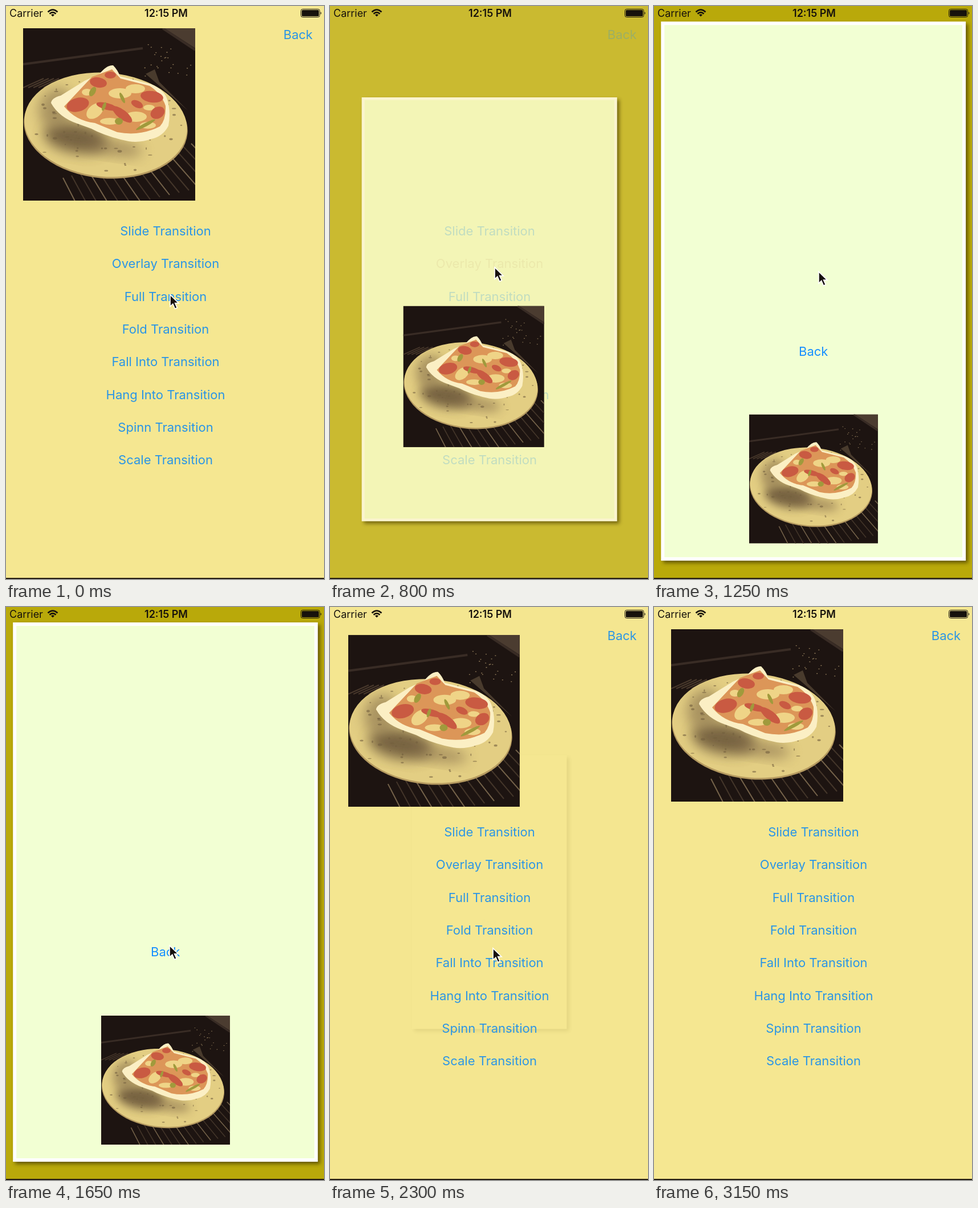
Recreate the animation shown at these times as an HTML page. Size 558x1004 px, loop 3200 ms.

```html
<!DOCTYPE html>
<html lang="en">
<head>
<meta charset="utf-8">
<title>Overlay transition</title>
<style>
  html, body { margin: 0; width: 100%; height: 100%; overflow: hidden; background: #f5e791; }
  svg { display: block; width: 100vw; height: 100vh; }
  text { font-family: Inter, Roboto, sans-serif; }
  .link { font-size: 22px; fill: #2a95e6; text-anchor: middle; }
  .status { font-size: 18px; fill: #17120c; }
</style>
</head>
<body>
<svg id="stage" viewBox="0 0 558 1004">
  <defs>
    <filter id="blur" x="-20%" y="-20%" width="140%" height="140%"><feGaussianBlur stdDeviation="3"/></filter>
    <filter id="soft" x="-40%" y="-40%" width="180%" height="180%"><feGaussianBlur stdDeviation="11"/></filter>
    <clipPath id="photoClip"><rect width="302" height="302"/></clipPath>
    <clipPath id="plateClip"><ellipse cx="145" cy="169" rx="143" ry="91" transform="rotate(5 145 169)"/></clipPath>
  </defs>
  <rect id="backdrop" width="558" height="1004"/>
  <rect id="shadow" fill="#4a3c00" filter="url(#blur)"/>
  <g id="card">
    <rect id="paper" x="-264.5" y="-469.5" width="529" height="939" stroke-width="6"/>
    <text id="cardBack" class="link" y="113" style="fill:#168fff">Back</text>
  </g>
  <g id="menu"><text class="link" x="512.5" y="58">Back</text></g>
  <rect id="veil" fill="#f5e791"/>
  <g id="photo" clip-path="url(#photoClip)"></g>
  <rect y="1002" width="558" height="2" fill="#241c10"/>
  <g>
    <text class="status" x="6" y="19">Carrier</text>
    <text class="status" x="281" y="19" text-anchor="middle" font-weight="600">12:15 PM</text>
    <g fill="none" stroke="#17120c" stroke-width="2.6">
      <path d="M73.5 10.5Q82 2.5 90.5 10.5M76.5 13.8Q82 8.6 87.5 13.8"/>
      <path d="M79 15.5Q82 13 85 15.5L82 18.6Z" fill="#17120c" stroke="none"/>
    </g>
    <rect x="517.5" y="5.5" width="33" height="14" rx="3" fill="none" stroke="#17120c"/>
    <rect x="519" y="7" width="30" height="11" rx="1.5" fill="#17120c"/>
    <path d="M552 10q2.5 2.5 0 5z" fill="#17120c"/>
  </g>
  <path id="cursor" d="M0 0V20.5L4.8 16L8.5 24.5L12.3 22.8L8.6 14.6H15Z" fill="#17110e" stroke="#fff" stroke-width="1.6"/>
</svg>
<script>
const LOOP = 3200, SHOW = 700, HIDE = 2126;
const YELLOW = [245, 231, 145], OLIVE = [185, 169, 10], PALE = [242, 255, 211], WHITE = [255, 255, 255];
const $ = id => document.getElementById(id);
const clamp = v => Math.max(0, Math.min(1, v));
const lerp = (a, b, k) => a + (b - a) * k;
const blend = (a, b, k) => `rgb(${a.map((v, i) => Math.round(lerp(v, b[i], clamp(k))))})`;
const set = (id, attrs) => { for (const k in attrs) $(id).setAttribute(k, attrs[k]); };

const labels = ['Slide', 'Overlay', 'Full', 'Fold', 'Fall Into', 'Hang Into', 'Spinn', 'Scale'];
$('menu').innerHTML += labels.map((name, i) =>
  `<text class="link" x="280" y="${402 + i * 57.3}">${name} Transition</text>`).join('');
const overlayLink = $('menu').children[2];

let seed = 7;
const random = () => (seed = seed * 16807 % 2147483647) / 2147483647;
const blob = (x, y, rx, ry, fill, turn = 0, extra = '') =>
  `<ellipse cx="${x}" cy="${y}" rx="${rx}" ry="${ry}" fill="${fill}" transform="rotate(${turn} ${x} ${y})" ${extra}/>`;
const blobs = (list, fill) => list.map(([x, y, rx, ry, turn]) => blob(x, y, rx, ry, fill, turn)).join('');
const repeat = (n, draw) => Array.from({ length: n }, (_, i) => draw(i)).join('');

function drawPhoto() {
  const bars = repeat(16, i => `<path d="M${70 + i * 15} ${262 - i * 4}l${34 + i * 2} 66" stroke="${i % 3 ? '#44362a' : '#75634a'}" stroke-width="2"/>`)
    + repeat(10, i => `<path d="M${i * 9} 104l36-16" stroke="#49392c" stroke-width="2"/>`);
  const specks = repeat(120, () => {
    const angle = random() * 6.28, reach = Math.sqrt(random());
    return blob(145 + 138 * reach * Math.cos(angle), 170 + 86 * reach * Math.sin(angle),
      1 + random() * 3, .8 + random() * 1.5, '#74603f', 0, 'opacity=".6"');
  });
  const glints = repeat(24, () => blob(205 + random() * 95, 25 + random() * 70, 1.2, .8, '#8f7a59'));
  const pepperoni = [[96, 134, 20, 12, -15], [132, 95, 15, 9, 10], [174, 151, 21, 8, 38], [226, 120, 20, 10, 8], [147, 137, 19, 6, 15], [236, 148, 13, 10, -30], [153, 82, 10, 6, 0], [200, 133, 11, 6, 25]];
  const cheese = [[126, 145, 17, 11, -40], [170, 114, 20, 9], [198, 155, 19, 9], [197, 106, 17, 8], [152, 163, 17, 6], [112, 112, 9, 6], [221, 139, 10, 5], [219, 170, 14, 6]];
  const peppers = [[122, 111, 5, 9, 30], [174, 122, 3, 10, -25], [215, 169, 19, 3, -28], [168, 163, 7, 6], [142, 137, 3, 8, 20]];
  $('photo').innerHTML = `<rect width="302" height="302" fill="#1d1411"/>
    <path d="M248 0H302V35Z" fill="#4b3c30"/><path d="M245 0L302 38M0 63L210 35" stroke="#392c25" stroke-width="4"/>
    <path d="M215 80l16-8 8 22 50 50z" fill="#493b2d"/>${bars}${glints}
    ${blob(145, 172, 144, 91, '#b59a60', 5)}${blob(145, 169, 143, 91, '#e3ce83', 5)}
    <g clip-path="url(#plateClip)">
      ${blob(92, 192, 56, 26, '#5d4832', 10, 'filter="url(#soft)" opacity=".8"')}
      ${blob(58, 140, 30, 36, '#927c52', 20, 'filter="url(#soft)" opacity=".7"')}
      ${blob(160, 210, 50, 14, '#866e4c', 8, 'filter="url(#soft)" opacity=".6"')}${specks}
    </g>
    <path d="M49 131Q50 122 66 118L108 92L134 80Q147 64 158 65Q166 73 170 84L225 98Q246 107 252 122Q260 145 255 171Q245 190 225 194Q205 201 185 198Q155 192 130 181L120 176L95 167Q63 156 49 131Z" fill="#fbefc4"/>
    <path d="M72 137L104 103L121 85L156 72L171 88L222 101Q243 115 250 136Q251 160 240 172Q205 190 165 182L126 166Q92 162 72 137Z" fill="#dc9658"/>
    ${blobs(cheese, '#efd487')}${blobs(pepperoni, '#c95a42')}${blobs(peppers, '#a09a3c')}`;
}

// Underdamped step response, damping ratio 0.7
function spring(ms, omega) {
  if (ms <= 0) return 0;
  const a = .7 * omega * ms / 1000, b = a * Math.sqrt(.51) / .7;
  return 1 - Math.exp(-a) * (Math.cos(b) + a / b * Math.sin(b));
}

// Points are [time, x, y]
const cursorPath = [[0, 288, 506], [150, 288, 506], [500, 289, 458], [1200, 289, 458], [1550, 288, 588],
  [1750, 286, 598], [2800, 286, 598], [2950, 432, 620]];

function drawCursor(t) {
  const i = cursorPath.findIndex(p => p[0] > t);
  set('cursor', { visibility: i < 0 ? 'hidden' : 'visible' });
  if (i < 1) return;
  const [a, b] = [cursorPath[i - 1], cursorPath[i]];
  const k = (t - a[0]) / (b[0] - a[0]), ease = k * k * (3 - 2 * k);
  set('cursor', { transform: `translate(${lerp(a[1], b[1], ease)} ${lerp(a[2], b[2], ease)})` });
}

function drawCard(t, p, q) {
  const leaving = t >= HIDE;
  const visible = t >= SHOW && q < 1 && t < HIDE + 400;
  const w = leaving ? lerp(535, 267.5, q) : lerp(226, 535, p);
  const h = leaving ? lerp(945, 472.5, q) : lerp(226, 945, p);
  const cx = 279.7, cy = leaving ? 499.5 : lerp(613, 499.5, p);
  const box = { x: cx - w / 2, y: cy - h / 2, width: w, height: h };
  const tint = leaving ? 1 - q / .45 : (p - .4) / .5;
  const shade = leaving ? .75 * Math.sqrt(clamp(1 - q)) : lerp(.4, .75, clamp(p));
  set('card', { transform: `translate(${cx} ${cy}) scale(${w / 535} ${h / 945})`, opacity: +visible });
  set('paper', { fill: blend(YELLOW, PALE, tint), stroke: blend(YELLOW, WHITE, tint) });
  set('cardBack', { opacity: leaving ? clamp(1 - q) : clamp(.3 + p) });
  set('shadow', { ...box, x: box.x + 4, y: box.y + 4, opacity: visible ? shade : 0 });
  set('veil', { ...box, opacity: visible && !leaving ? .4 * clamp(1 - p) : 0 });
}

function render(t) {
  const p = spring(t - SHOW, 19.6), q = spring(t - HIDE, 18);
  const away = t < HIDE ? p : 1 - q;
  set('backdrop', { fill: t < HIDE ? blend(YELLOW, OLIVE, p) : blend(OLIVE, YELLOW, q ** .7) });
  set('menu', { opacity: clamp(1 - away) });
  overlayLink.style.fill = t >= 600 && t < 1100 ? '#d3c491' : '';
  drawCard(t, p, q);
  set('photo', { transform: `translate(${lerp(30, 167, away)} ${lerp(39, 716, away)}) scale(${lerp(302, 226, away) / 302})` });
  drawCursor(t);
}

drawPhoto();
const start = performance.now();
function tick() {
  render((performance.now() - start) % LOOP);
  requestAnimationFrame(tick);
}
tick();
</script>
</body>
</html>
```
